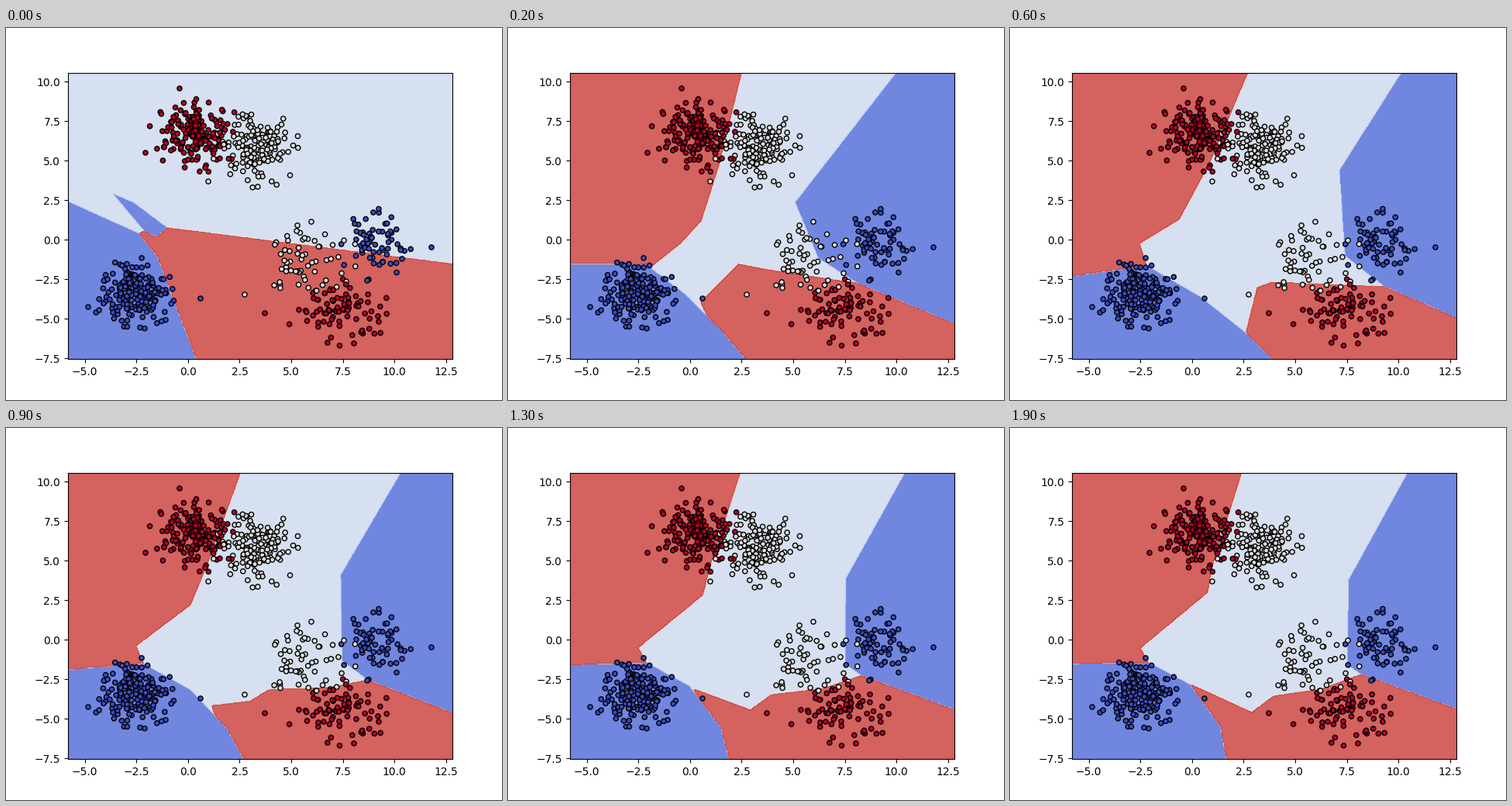
Recreate the animation shown at these times as a matplotlib script. Size 640 px wide and 480 px high, loop 2 s.

```python
import numpy as np
import matplotlib.pyplot as plt
from matplotlib.animation import FuncAnimation
from matplotlib.path import Path

LEFT, RIGHT, BOTTOM, TOP = -5.816, 12.81, -7.537, 10.573
BLUE, WHITE, RED = 0, 1, 2
FRAMES, MIDDLE = 20, 6

rng = np.random.default_rng(7)
fig, ax = plt.subplots(figsize=(6.4, 4.8), dpi=100)


def to_data(px):
    """Stage pixels (y down) to axis units."""
    px = np.asarray(px, float)
    x = LEFT + (px[:, 0] - 80) * (RIGHT - LEFT) / 496
    y = TOP - (px[:, 1] - 57.6) * (TOP - BOTTOM) / 369.6
    return np.column_stack([x, y])


# ---- sample points -------------------------------------------------------
def cluster(n, centre, spread):
    """Gaussian cloud without far tails."""
    z = rng.normal(size=(2 * n, 2))
    z = z[np.hypot(z[:, 0], z[:, 1]) < 2.6][:n]
    return np.array(centre) + z * spread


clouds = [
    (RED, cluster(185, (246, 138), (24, 21))),
    (WHITE, cluster(160, (322, 156), (24, 20))),
    (WHITE, cluster(60, (387, 296), (27, 24))),
    (BLUE, cluster(68, (479, 281), (21, 20))),
    (RED, cluster(78, (432, 366), (28, 20))),
    (BLUE, cluster(195, (166, 343), (24, 18))),
    # outermost samples
    (RED, [(224, 78), (180, 161), (334, 368), (449, 407)]),
    (BLUE, [(549, 283), (251, 349), (106, 360)]),
    (WHITE, [(308, 344), (261, 198)]),
]
points = to_data(np.vstack([pts for _, pts in clouds]))
labels = np.repeat([c for c, _ in clouds], [len(pts) for _, pts in clouds])
order = rng.permutation(len(points))
points, labels = points[order], labels[order]

# ---- decision regions ----------------------------------------------------
# label, corners outside the axes, then the border early, midway and settled
regions = [
    (RED, [(580, 358), (580, 430)],
     [(250, 430), (195, 318), (277, 276), (340, 298), (400, 318), (420, 325)],
     [(320, 430), (305, 391), (319, 335), (338, 328), (440, 332), (483, 334)],
     [(259, 430), (233, 331), (312, 367), (340, 346), (402, 337), (453, 318)]),
    (RED, [(75, 335), (75, 50)],
     [(296, 57), (286, 180), (279, 250), (277, 276), (190, 312)],
     [(307, 57), (257, 175), (218, 247), (167, 278), (176, 306)],
     [(299, 57), (261, 178), (255, 212), (168, 284), (179, 303)]),
    (BLUE, [(580, 50)],
     [(497, 57), (318, 265), (370, 300), (420, 325), (580, 391)],
     [(505, 57), (425, 183), (432, 294), (483, 334), (580, 376)],
     [(513, 57), (437, 195), (435, 306), (453, 318), (580, 364)]),
    (BLUE, [(75, 430)],
     [(79, 289), (180, 303), (215, 342), (255, 394), (278, 430)],
     [(79, 320), (176, 306), (245, 346), (302, 391), (343, 430)],
     [(79, 304), (179, 302), (233, 331), (272, 385), (280, 430)]),
]

seam = [(172, 265), (196, 295), (209, 330), (247, 430)]
notch = [(209, 258), (193, 270), (178, 262)]
untrained = [
    (BLUE, [(75, 221)] + seam + [(75, 430)]),
    (RED, seam + [(580, 430), (580, 305)] + notch),
    (BLUE, [(137, 213), (165, 225)] + notch),
]


def settle(a, b, u):
    """Fast at first, then slowing down like a converging fit."""
    return np.array(b) + (np.array(a) - b) * (1 - u) ** 3


def outlines(step):
    if step == 0:
        return untrained
    shapes = []
    for label, corners, early, midway, settled in regions:
        if step < MIDDLE:
            border = settle(early, midway, (step - 1) / (MIDDLE - 1))
        else:
            border = settle(midway, settled, (step - MIDDLE) / (FRAMES - 1 - MIDDLE))
        shapes.append((label, np.vstack([border, corners])))
    return shapes


gx, gy = np.meshgrid(np.linspace(LEFT, RIGHT, 640), np.linspace(BOTTOM, TOP, 600))
grid = np.column_stack([gx.ravel(), gy.ravel()])


def classify(step):
    z = np.full(len(grid), WHITE, float)
    for label, outline in outlines(step):
        z[Path(to_data(outline)).contains_points(grid)] = label
    return z.reshape(gx.shape)


# ---- drawing -------------------------------------------------------------
ax.scatter(points[:, 0], points[:, 1], c=labels, s=20, cmap="coolwarm",
           edgecolors="k", linewidths=1, zorder=1)
ax.set_xlim(LEFT, RIGHT)
ax.set_ylim(BOTTOM, TOP)
ax.set_xticks(np.arange(-5, 12.6, 2.5))
ax.set_yticks(np.arange(-7.5, 10.1, 2.5))
fills = []


def draw(step):
    while fills:
        fills.pop().remove()
    fills.append(ax.contourf(gx, gy, classify(step), levels=np.arange(0, 2.01, 0.25),
                             cmap="coolwarm", alpha=0.8, zorder=0))
    return fills


anim = FuncAnimation(fig, draw, frames=FRAMES, interval=100, repeat=True,
                     repeat_delay=0, blit=False)
plt.show()
```
